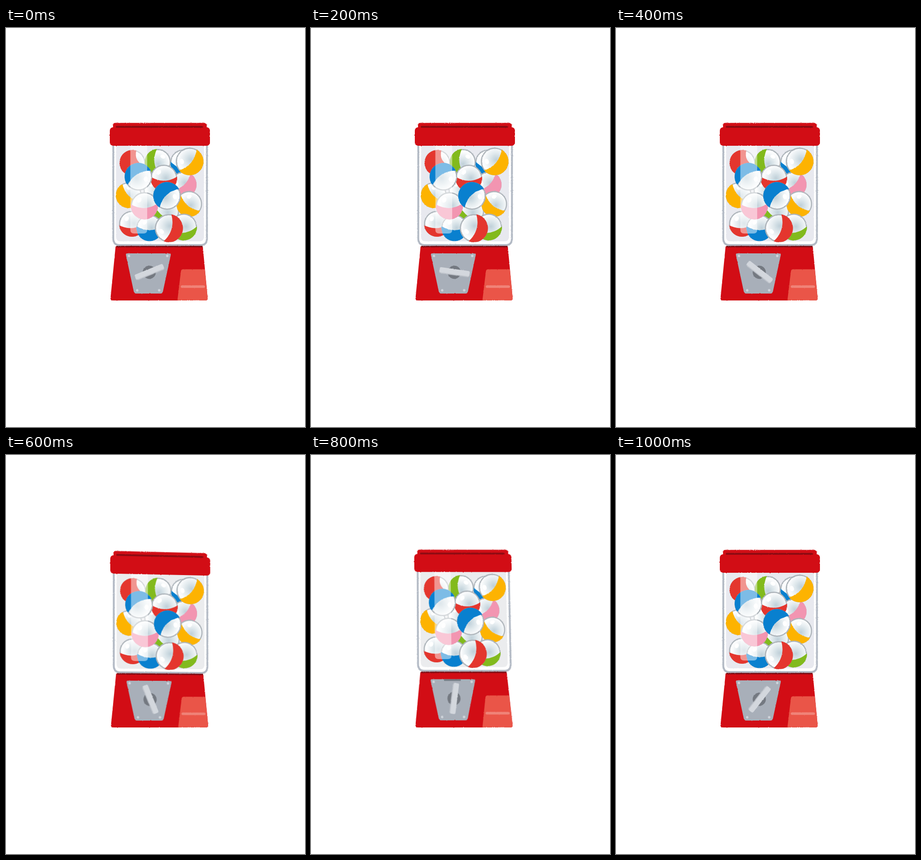
Recreate the animation shown at these times as an HTML page. Size 648 by 864 pixels, loop 1200 ms.

```html
<!DOCTYPE html>
<html lang="en">
<head>
<meta charset="utf-8">
<title>Capsule machine</title>
<style>
  html, body { margin: 0; width: 100%; height: 100%; overflow: hidden; background: #fff; }
  #machine {
    display: block; width: 648px; height: 864px;
    transform-origin: 225px 206px;
    animation: jolt 1200ms step-end infinite;
  }
  #handle {
    transform-origin: 311px 528.7px;
    animation: turn 1200ms steps(6, end) infinite;
  }
  #glass { animation: tint 1200ms step-end infinite; }
  #slot { opacity: 0; animation: slot 1200ms step-end infinite; }

  /* the whole machine leans right, then squeezes, then settles */
  @keyframes jolt {
    0%, 83.3333% { transform: none; }
    50% { transform: matrix3d(1.0118, .024897, 0, .00006484, 0, .992455, 0, -.00000609, 0, 0, 1, 0, 1, 2, 0, 1); }
    66.6667% { transform: matrix3d(.969627, .000922, 0, .0000024, .003385, .970406, 0, -.000080456, 0, 0, 1, 0, -1.3, -.5, 0, 1); }
  }
  @keyframes turn {
    from { transform: rotate(-22deg); }
    to { transform: rotate(158deg); }
  }
  @keyframes tint {
    0%, 83.3333% { fill: #e8e9ef; }
    50% { fill: #ebecee; }
  }
  @keyframes slot {
    0%, 83.3333% { opacity: 0; }
    66.6667% { opacity: 1; }
  }
</style>
</head>
<body>
<svg id="machine" viewBox="0 0 648 864" xmlns="http://www.w3.org/2000/svg">
  <defs>
    <filter id="rough" x="-5%" y="-10%" width="110%" height="120%" color-interpolation-filters="sRGB">
      <feTurbulence type="fractalNoise" baseFrequency=".35" numOctaves="2" seed="4"/>
      <feDisplacementMap in="SourceGraphic" scale="2.2" xChannelSelector="R" yChannelSelector="G"/>
    </filter>
    <radialGradient id="sheen" gradientUnits="userSpaceOnUse" cx="5" cy="0" r="27">
      <stop offset="0" stop-color="#bfd0d9"/>
      <stop offset=".5" stop-color="#dfe8ec"/>
      <stop offset="1" stop-color="#fbfcfd"/>
    </radialGradient>
  </defs>

  <g filter="url(#rough)">
    <path d="M232.5 245V456Q232.5 470 246 470H422Q435.5 470 435.5 456V245Z" fill="#fff" stroke="#b2b9c4" stroke-width="4"/>
    <path id="glass" d="M238.5 250H429V452Q429 462 419 462H248.5Q238.5 462 238.5 452Z" fill="#e8e9ef"/>
  </g>

  <g id="balls" filter="url(#rough)"></g>
  <path d="M269.5 254H306V437Q306 445 298 445H277.5Q269.5 445 269.5 437Z" fill="#fff" opacity=".47"/>

  <g filter="url(#rough)">
    <rect x="232" y="205.5" width="203" height="20" rx="5" fill="#d10e16"/>
    <rect x="225" y="215" width="217" height="40" rx="7" fill="#d20d15"/>
    <rect x="238" y="212" width="189" height="4" rx="1.5" fill="#8e0b12"/>
  </g>

  <g filter="url(#rough)">
    <path d="M237.5 473H426.5L437 585Q437.5 590 432 590H232Q226 590 226.5 585Z" fill="#d20d15"/>
    <path d="M239 473.2H426" stroke="#7d0d14" stroke-width="3"/>
    <path d="M384 522.5H430.7L437 585Q437.5 590 432 590H371.5L379 527Q379.5 522.5 384 522.5Z" fill="#ea5548"/>
    <path d="M381.5 560H428.5" stroke="#f08378" stroke-width="5.5" stroke-linecap="round"/>
    <path d="M263 488H354Q358 488 357 492L340 571Q339 575 335 575H282Q278 575 277 571L260 492Q259 488 263 488Z" fill="#a8afb9"/>
    <g fill="#cfd4db">
      <circle cx="266.5" cy="493.5" r="2.7"/>
      <circle cx="349.5" cy="493.5" r="2.7"/>
      <circle cx="284.5" cy="568" r="2.7"/>
      <circle cx="332" cy="568" r="2.7"/>
    </g>
    <circle cx="310.5" cy="529" r="14.3" fill="#747981"/>
  </g>
  <rect id="slot" x="289" y="488" width="37" height="3.5" rx="1" fill="#747981"/>

  <g id="handle">
    <g filter="url(#rough)">
      <rect x="278" y="522" width="66" height="13.4" rx="4" fill="#bfc4cb"/>
      <rect x="278" y="522" width="66" height="11.5" rx="4" fill="#d3d7dd"/>
    </g>
  </g>
</svg>
<script>
  const colors = { red: "#e4362e", blue: "#0980cf", green: "#82ba1d", gold: "#fdb301", pink: "#f295b1" };

  // colour, centre x, centre y, radius, tilt, height of the colour edge; back to front
  const balls = [
    ["blue", 384, 291, 28, 17, 10],
    ["pink", 325, 350, 27, 0, 22],
    ["red", 274, 292, 28, 60, -18],
    ["green", 329, 290, 28, 84, 3],
    ["green", 347, 397, 28, 35, 8],
    ["gold", 266, 362, 28, 45, -4],
    ["pink", 385, 339, 28, -42, -4],
    ["gold", 397, 381, 28, 40, 0],
    ["red", 273, 424, 28, -5, 5],
    ["blue", 311, 433, 28.5, 0, 0],
    ["green", 385, 431, 29, -10, 8],
    ["red", 342, 325, 29, 0, 1],
    ["blue", 287, 322, 30, 148, 1],
    ["pink", 300, 385, 29.5, -2, 0],
    ["blue", 349, 363.5, 30, 136, -3],
    ["gold", 398, 289, 30, -50, -1],
    ["red", 353, 433.5, 30.5, -74, 1]
  ];

  // coloured cap whose rim sags towards its own side
  function cap(edge) {
    const y = edge - 4;
    const x = Math.sqrt(900 - y * y);
    return `M${-x} ${y}A30 30 0 ${y < 0 ? 1 : 0} 0 ${x} ${y}Q0 ${edge + 14} ${-x} ${y}Z`;
  }

  const drawBall = ([color, x, y, r, tilt, edge]) => `
    <g transform="translate(${x} ${y}) rotate(${tilt}) scale(${r / 30})">
      <circle r="28.7" fill="url(#sheen)" stroke="#adb4ba" stroke-width="2.6"/>
      <ellipse cx="-11" cy="-13" rx="4.5" ry="6" fill="#fff" transform="rotate(30 -11 -13)"/>
      <path d="${cap(edge)}" fill="${colors[color]}"/>
    </g>`;

  document.getElementById("balls").innerHTML = balls.map(drawBall).join("");
</script>
</body>
</html>
```
